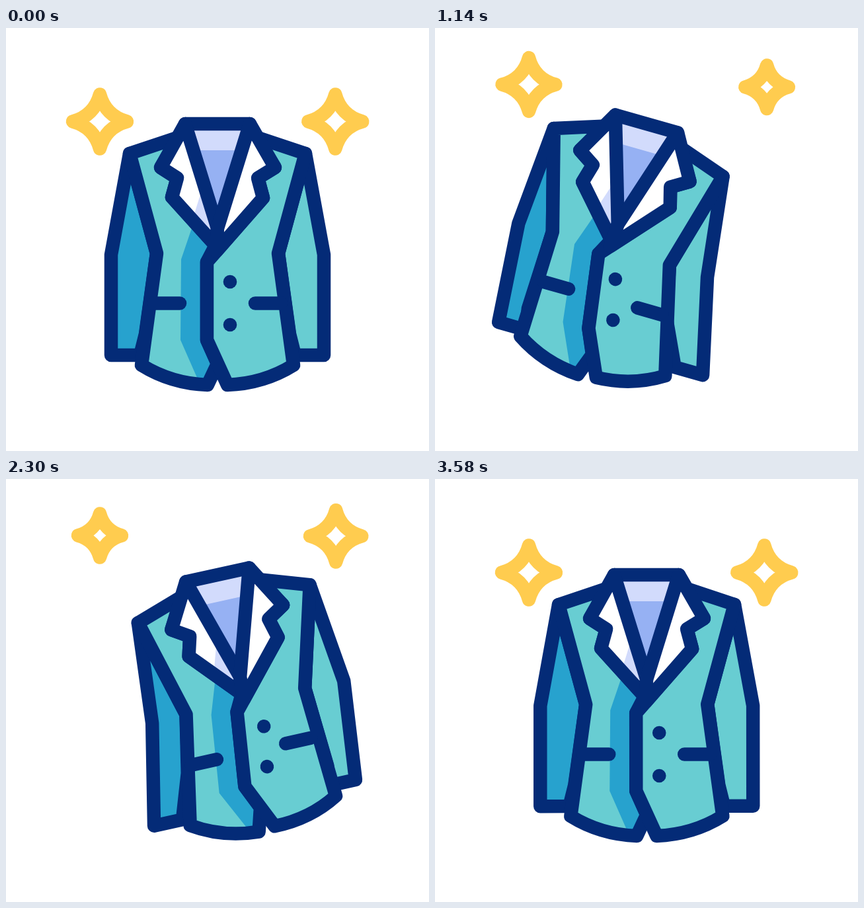
Write an HTML page with a canvas that moves like this. It is 640 px wide and 640 px high and loops after 3600 ms.

```html
<!DOCTYPE html>
<html>
<head>
<meta charset="utf-8">
<style>
  html, body { margin: 0; height: 100%; overflow: hidden; background: #fff; }
  canvas { display: block; }
</style>
</head>
<body>
<canvas id="stage" width="640" height="640"></canvas>
<script>
const ctx = document.getElementById('stage').getContext('2d');
const LOOP = 3600;
const NAVY = '#042b77', TEAL = '#68cdd2', BLUE = '#27a2ce', YELLOW = '#ffcc4f';
const LAVENDER = '#d2dbfc', PERIWINKLE = '#96b1f3', WHITE = '#fff';

// Keys are [time, value] pairs, eased in and out between neighbours.
function track(t, keys) {
  if (t <= keys[0][0]) return keys[0][1];
  for (let i = 1; i < keys.length; i++) {
    const [t0, a] = keys[i - 1], [t1, b] = keys[i];
    if (t < t1) {
      const p = (t - t0) / (t1 - t0);
      return a + (b - a) * p * p * (3 - 2 * p);
    }
  }
  return keys[keys.length - 1][1];
}

// Seven alternating keys, 400 ms apart.
const pulse = (start, a, b) =>
  Array.from({ length: 7 }, (_, i) => [start + i * 400, i % 2 ? b : a]);

const swingKeys = [[0, 0], ...pulse(400, 18, -18), [3200, -9], [3600, 0]];
const bendKeys = [[0, 0], [400, 1], [3200, 1], [3600, 0]];
const liftKeys = [[0, 0], [400, 56], [3000, 56], [3400, 0]];
const leftStarKeys = pulse(400, 1, 0.77);
const rightStarKeys = pulse(600, 1, 0.72);

// A four-number entry is a quadratic curve: control point, end point.
function shape(points, fill, stroke, close = true) {
  ctx.beginPath();
  points.forEach((p, i) => {
    if (!i) ctx.moveTo(...p);
    else if (p.length === 4) ctx.quadraticCurveTo(...p);
    else ctx.lineTo(...p);
  });
  if (close) ctx.closePath();
  if (fill) {
    ctx.fillStyle = fill;
    ctx.fill();
  }
  if (stroke) {
    ctx.strokeStyle = stroke;
    ctx.stroke();
  }
}

function dot(x, y) {
  ctx.beginPath();
  ctx.arc(x, y, 10.3, 0, 7);
  ctx.fillStyle = NAVY;
  ctx.fill();
}

function star(x, y, size) {
  const r = 41 * size, c = 8.7 * size;
  shape([
    [x, y - r],
    [x + c, y - c, x + r, y],
    [x + c, y + c, x, y + r],
    [x - c, y + c, x - r, y],
    [x - c, y - c, x, y - r]
  ], null, YELLOW);
}

function jacket(angle, bend) {
  const k = angle / 18;
  const up = Math.max(0, k), down = Math.min(0, k);
  // Rest position plus a held bend (ex, ey) and a swing part (dx, dy).
  const at = (x, y, ex = 0, ey = 0, dx = 0, dy = 0) =>
    [x + ex * bend + dx * k, y + ey * bend + dy * k];

  const shoulderL = [187, 190], shoulderR = [453, 190];
  const waistL = [228, 341], waistR = [412, 341];
  const hemL = at(205, 510, 4.5, -3.7, 17);
  const hemR = at(435, 510, 0.3, -2.5, 18.4, -4);
  const tipL = at(305, 540, 4, -2, 17);
  const tipR = at(335, 540, 0.3, -5, 18.7);
  const knee = at(304, 472, 0.1, -5.5, 18.5);
  const slit = at(320, 508, 0.2, -5, 18.6);
  const front = [304, 354];
  const lapelL = [[234, 211], [259, 227], [251, 256], [317, 329]];
  const lapelR = [[407, 211], [381, 227], [389, 257]];

  // Sleeves
  shape([
    shoulderL, at(159, 343, 16), at(159, 495, 4, 0, 27), at(203, 495, 4, 0, 27),
    [211 + 15 * up, 463 + 50 * down], waistL
  ], BLUE, NAVY);
  shape([
    shoulderR, at(481, 343, -9), at(481, 495, -2.5, -4.5, 31, -3.5),
    at(437, 495, -2.5, -4.5, 31, -3.5), [429 + 13 * down, 463 - 50 * up], waistR
  ], TEAL, NAVY);

  // Left front with its shadow
  const leftFront = [
    shoulderL, [262, 165], ...lapelL, front, knee, slit, tipL,
    [...at(250, 538, 4, -3, 17), ...hemL], waistL
  ];
  shape(leftFront, TEAL);
  shape([
    [281, 303], [265, 350], at(264, 472, 0.1, -4, 18.5),
    at(293, 538, 3, -3, 17.5), tipL, slit, knee, front, [317, 329]
  ], BLUE);
  shape(leftFront, null, NAVY);
  shape([at(224, 416.5, 2.8, 1, 10.3), at(263, 416.5, 2.8, 1, 10.3)], null, NAVY, false);

  // Right front
  shape([
    shoulderR, [378, 165], ...lapelR, front, knee, tipR,
    [...at(390, 538, 0.3, -3.5, 18.5, -2), ...hemR], waistR
  ], TEAL, NAVY);
  shape([at(377, 416.5, -3.8, 0, 11), at(416, 416.5, -3.8, 0, 11)], null, NAVY, false);
  dot(339, 384);
  dot(...at(339, 449, 1.2, -4.5, 14));

  // Lining and lapels
  shape([[271, 145], [369, 145], [320, 303]], LAVENDER);
  shape([[283, 185], [357, 185], [320, 303]], PERIWINKLE);
  shape([[271, 145], [369, 145]], null, NAVY, false);
  const collarL = [[271, 145], ...lapelL, [320, 303]];
  shape(collarL, WHITE);
  shape([[299, 236], [285, 281], [317, 329], [320, 303]], LAVENDER);
  shape(collarL, null, NAVY);
  shape([[369, 145], ...lapelR, [318, 338], [320, 303]], WHITE, NAVY);
}

function draw(now) {
  const t = now % LOOP;
  ctx.fillStyle = WHITE;
  ctx.fillRect(0, 0, 640, 640);
  ctx.lineWidth = 20.5;
  ctx.lineJoin = ctx.lineCap = 'round';

  const y = 141.5 - track(t, liftKeys);
  const right = track(t, rightStarKeys);
  const shift = 19 * (1 - right);
  star(142, y, track(t, leftStarKeys));
  star(498.3 + shift, y + shift, right);

  const angle = track(t, swingKeys);
  ctx.save();
  ctx.translate(320, 145);
  ctx.rotate(angle * Math.PI / 180);
  ctx.translate(-320, -145);
  jacket(angle, track(t, bendKeys));
  ctx.restore();
}

const start = performance.now();
function tick() {
  draw(performance.now() - start);
  requestAnimationFrame(tick);
}
tick();
</script>
</body>
</html>
```
